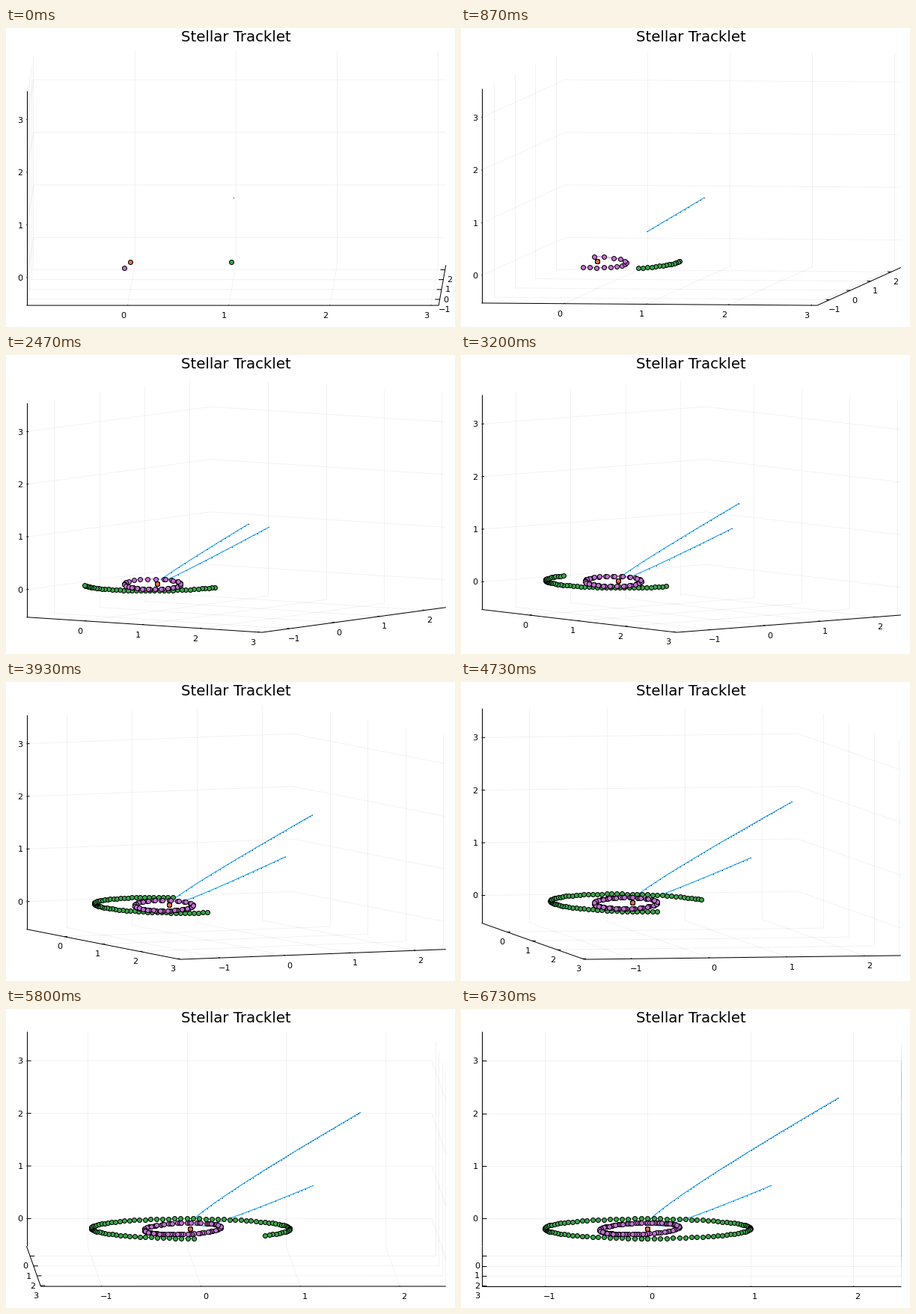
A matplotlib script for the animation above (6.79 s loop, 600 px wide and 400 px high).

```python
import numpy as np
import matplotlib.pyplot as plt
from matplotlib.animation import FuncAnimation
from matplotlib.collections import LineCollection

N, LOOP = 102, 6790
PX = 0.72                                  # points per pixel at 100 dpi
SPAN = 4.077                               # common length of all three axes
LO = np.array([-1.0, -1.613, -0.525])
HI = LO + SPAN
LEFT, WIDTH = 27.5, 560.3
BOTTOM, DEPTH, HEIGHT = 371.1, 53.8, 287
TICK = 0.0113 * SPAN
TICKS = {"x": range(0, 4), "y": range(-1, 3), "z": range(0, 4)}

plt.rcParams["font.family"] = "DejaVu Sans"


def project(pts, deg):
    """Rotating oblique view, stretched to fill the plot area."""
    x, y, z = np.moveaxis((np.asarray(pts, float) - LO) / SPAN, -1, 0)
    c, s = np.cos(np.radians(deg)), np.sin(np.radians(deg))
    u = LEFT + WIDTH * (x * c + y * s) / (c + s)
    v = BOTTOM - DEPTH * ((1 - x) * s * s + y * c * c) - HEIGHT * z
    return np.stack([u, v], -1)


def orbit(t, a, e, w, e1, e2):
    """Kepler orbit, t in years since perihelion, w in degrees from e1."""
    m = 2 * np.pi * t / a ** 1.5
    ecc = np.cbrt(6 * m)
    for _ in range(40):
        ecc = ecc - (ecc - e * np.sin(ecc) - m) / (1 - e * np.cos(ecc))
    p, q = a * (np.cos(ecc) - e), a * np.sqrt(1 - e * e) * np.sin(ecc)
    w = np.radians(w)
    f, g = p * np.cos(w) - q * np.sin(w), p * np.sin(w) + q * np.cos(w)
    return np.outer(f, e1) + np.outer(g, e2)


def comet(t):
    t = t - 0.196
    plane = np.array([1, 0, 1]) / np.sqrt(2), np.array([0, 1, 0])
    fall = orbit(t, 12.766, 0.998955, 30.94 - 180, *plane)
    rise = orbit(t, 12.766, 0.998955, 28.8 - 180, *plane)
    return np.where(t[:, None] < 0, fall, rise)


def inner_planet(t):
    period, inc, node = 0.242, np.radians(7), np.radians(48.3)
    e1 = np.array([np.cos(node), np.sin(node), 0])
    e2 = np.array([-np.sin(node) * np.cos(inc),
                   np.cos(node) * np.cos(inc), np.sin(inc)])
    return orbit(t + period * 188.6 / 360, period ** (2 / 3), 0.2056, 29.2, e1, e2)


def outer_planet(t):
    phi = 2 * np.pi * t
    return np.stack([np.cos(phi), -np.sin(phi), 0 * phi], -1)


time = np.arange(N) / 100
speck = dict(marker="o", ms=1.1 * PX, mew=0, ls="", color="black")
ball = dict(marker="o", ms=6 * PX, mew=PX, mec="black", lw=PX)
bodies = [
    (comet(time), speck),
    (comet(time), dict(color="#009afa", lw=PX)),
    (np.zeros((N, 3)), dict(ball, color="#e26f46")),
    (outer_planet(time), dict(ball, color="#3da44d")),
    (inner_planet(time), dict(ball, color="#c271d2")),
]

(x0, y0, z0), (x1, y1, z1) = LO, HI
grid3, tick3, anchors = [], [], []
for x in TICKS["x"]:
    grid3 += [[(x, y0, z0), (x, y1, z0)], [(x, y1, z0), (x, y1, z1)]]
    tick3.append([(x, y0, z0), (x, y0 + TICK, z0)])
    anchors.append((x, (x, y0, z0), -6))
for y in TICKS["y"]:
    grid3 += [[(x0, y, z0), (x1, y, z0)], [(x0, y, z0), (x0, y, z1)]]
    tick3.append([(x1, y, z0), (x1 - TICK, y, z0)])
    anchors.append((y, (x1, y, z0), 6))
for z in TICKS["z"]:
    grid3 += [[(x0, y0, z), (x0, y1, z)], [(x0, y1, z), (x1, y1, z)]]
    tick3.append([(x0, y0, z), (x0, y0 + TICK, z)])
    anchors.append((z, (x0, y0, z), None))
frame3 = [[(x0, y0, z0), (x1, y0, z0)],
          [(x1, y0, z0), (x1, y1, z0)],
          [(x0, y0, z0), (x0, y0, z1)]]

fig = plt.figure(figsize=(6, 4), dpi=100, facecolor="white")
ax = fig.add_axes([0, 0, 1, 1])
ax.set(xlim=(0, 600), ylim=(400, 0))
ax.axis("off")

grid = LineCollection([], colors=[(0, 0, 0, 0.05)], linewidths=PX, zorder=1)
axes = LineCollection([], colors="black", linewidths=PX, zorder=2)
ax.add_collection(grid)
ax.add_collection(axes)

trails = [ax.plot([], [], zorder=3 + i, **style)[0]
          for i, (_, style) in enumerate(bodies)]
labels = [ax.text(0, 0, str(n).replace("-", "\u2212"), fontsize=11.3 * PX,
                  ha="right" if dx is None else "center",
                  va="center_baseline", zorder=9)
          for n, _, dx in anchors]
ax.text(307.5, 18, "Stellar Tracklet", fontsize=19.8 * PX,
        ha="center", va="baseline")


def draw(k):
    deg = min(k + 1, 90)
    grid.set_segments(project(grid3, deg))
    axes.set_segments(project(frame3 + tick3, deg))
    for line, (path, _) in zip(trails, bodies):
        line.set_data(*project(path[:k + 1], deg).T)
    for label, (_, point, dx) in zip(labels, anchors):
        u, v = project(point, deg)
        label.set_position((22.5, v) if dx is None else (u + dx, v + 12.8))
    return [grid, axes, *trails, *labels]


anim = FuncAnimation(fig, draw, frames=N, interval=LOOP / N,
                     repeat=True, repeat_delay=0, blit=False)
plt.show()
```
